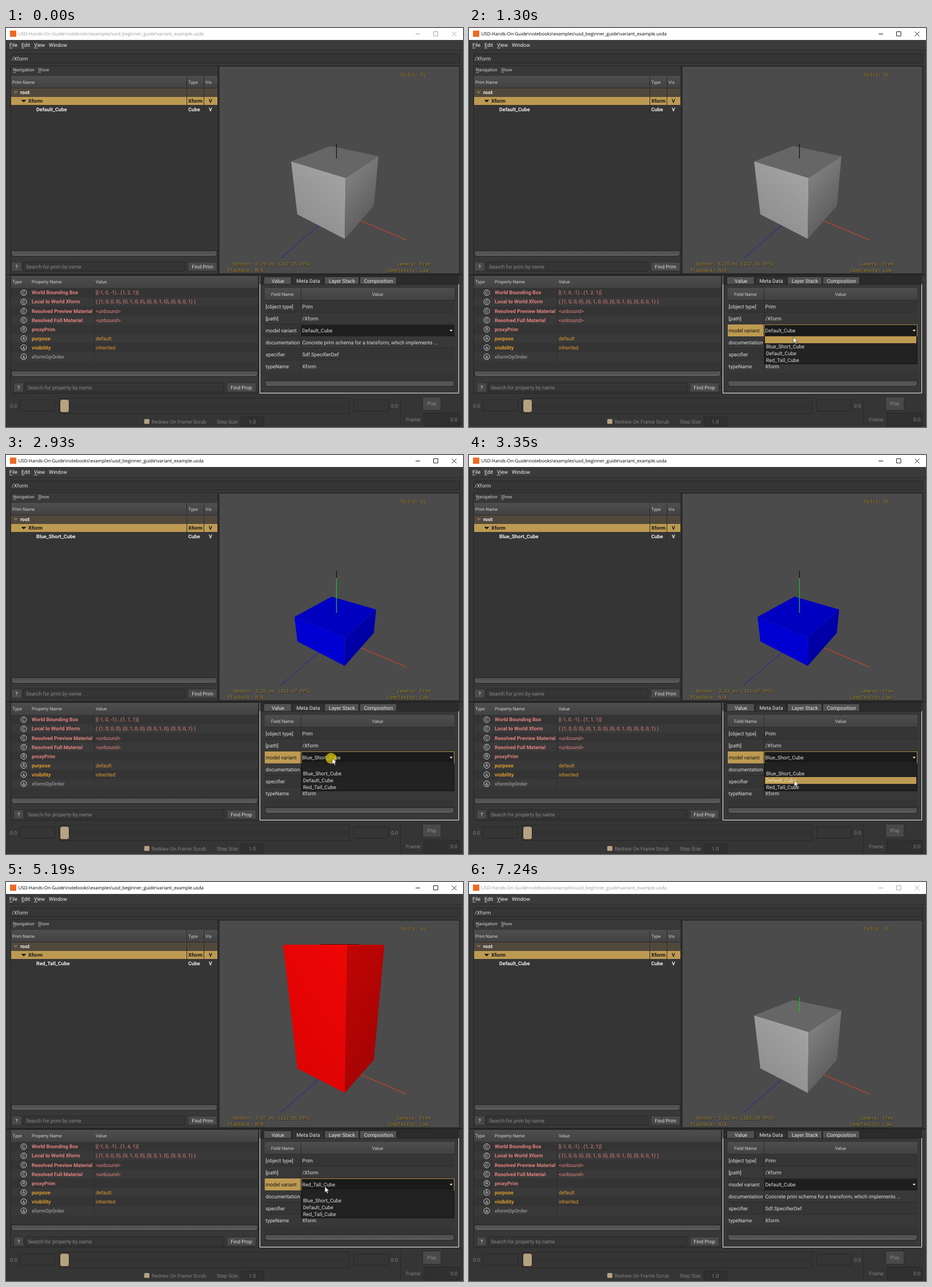
These frames come from a looping animation (800 by 700 pixels, 7.31 s). An HTML page:

```html
<!DOCTYPE html>
<html lang="en">
<head>
<meta charset="utf-8">
<title>Variant switching</title>
<style>
  html, body { margin: 0; width: 100%; height: 100%; overflow: hidden; background: #383838; }
  svg { display: block; width: 800px; height: 700px; }
  text { font-family: Roboto, Arial, sans-serif; text-rendering: geometricPrecision; }
  .title { font-family: "Open Sans", "Noto Sans", sans-serif; }
  .mono { font-family: "DejaVu Sans Mono", "Liberation Mono", monospace; }
</style>
</head>
<body>
<svg viewBox="0 0 800 700">
  <defs>
    <linearGradient id="head" x2="0" y2="1"><stop stop-color="#4e4e4e"/><stop offset="1" stop-color="#424242"/></linearGradient>
    <linearGradient id="bar" x2="0" y2="1"><stop stop-color="#4c4c4c"/><stop offset="1" stop-color="#5c5c5c"/></linearGradient>
  </defs>
  <g id="base"></g>
  <g id="live"></g>
</svg>
<script>
const LOOP = 7310;
const GOLD = '#bd9a52', PINK = '#e2827f', ORANGE = '#dd9a2e', LIGHT = '#dedede', DIM = '#8a8a8a', EDGE = '#262626';

const rect = (x, y, w, h, fill, more = '') =>
  `<rect x="${x}" y="${y}" width="${w}" height="${h}" fill="${fill}" ${more}/>`;
const text = (x, y, str, fill = LIGHT, size = 8.93, more = '') =>
  `<text x="${x}" y="${y}" fill="${fill}" font-size="${size}" ${more}>${str}</text>`;
const bold = (x, y, str, fill) => text(x, y, str, fill, 8.93, 'font-weight="700"');
const small = (x, y, str, more) => text(x, y, str, '#d0d0d0', 7.85, more);
const path = (d, stroke, width = 1, fill = 'none') =>
  `<path d="${d}" stroke="${stroke}" stroke-width="${width}" fill="${fill}"/>`;
const poly = (points, fill) => `<polygon points="${points}" fill="${fill}"/>`;
const field = (x, y, w, h, fill = '#353535') =>
  rect(x + .5, y + .5, w - 1, h - 1, fill, `stroke="${EDGE}" rx="1"`);
const button = (x, y, w, h, label, fill = LIGHT) =>
  rect(x + .5, y + .5, w - 1, h - 1, '#494949', 'stroke="#2c2c2c" rx="1.5"') +
  text(x + w / 2, y + h / 2 + 3.2, label, fill, 8.8, 'text-anchor="middle"');
const scrollbar = (x, y, w) =>
  `<path d="M${x} ${y}h${w}v5q0 5 -6 5h${12 - w}q-6 0 -6 -5z" fill="url(#bar)" stroke="#232323"/>`;
const mono = (x, y, str) =>
  text(x + .8, y + .8, str, '#1c1c1c', 8.08, 'class="mono"') + text(x, y, str, '#a4842a', 8.08, 'class="mono"');

function primPanel() {
  return rect(8, 66, 363, 366, '#383838', 'stroke="#222"') +
    small(12, 76.3, 'Navigation') + small(56, 76.3, 'Show') + path('M12 78h5.5M56 78h5', '#ccc', .7) +
    rect(9, 84, 361, 317, '#353535') + rect(9, 84, 361, 21, 'url(#head)') +
    small(11, 98, 'Prim Name') + small(319, 98, 'Type') + small(349, 98, 'Vis') +
    rect(9, 106, 361, 15, '#51483c') + rect(9, 121, 361, 14, GOLD) +
    path('M316.5 84v66M346.5 84v66', '#2d2d2d') + path('M9 105.5h361', '#2a2a2a') +
    poly('13,111 21,111 17,115.5', '#7b6f5f') + bold(25, 116.3, 'root', '#eee') +
    poly('26.5,126 35.5,126 31,130.5', '#1a1a1a') + bold(39, 131.2, 'Xform', '#151515') +
    bold(319, 131.2, 'Xform', '#151515') + bold(355, 131.2, 'V', '#151515') +
    bold(319, 146, 'Cube', '#eee') + bold(355, 146, 'V', '#eee') +
    scrollbar(9.5, 390.5, 360) +
    button(9, 410, 19, 17, '?') + field(30, 410, 284, 17) +
    text(35, 421.5, 'Search for prim by name', DIM) + button(318, 410, 52, 17, 'Find Prim');
}

function propertyPanel() {
  const rows = [
    ['C', 'World Bounding Box', '', PINK],
    ['C', 'Local to World Xform', '( (1, 0, 0, 0), (0, 1, 0, 0), (0, 0, 1, 0), (0, 0, 0, 1) )', PINK],
    ['C', 'Resolved Preview Material', '&lt;unbound&gt;', PINK],
    ['C', 'Resolved Full Material', '&lt;unbound&gt;', PINK],
    ['R', 'proxyPrim', '', PINK],
    ['A', 'purpose', 'default', ORANGE],
    ['A', 'visibility', 'inherited', ORANGE],
    ['A', 'xformOpOrder', '', DIM]
  ];
  let out = rect(8, 434, 434, 207, '#383838', 'stroke="#222"') +
    rect(9, 435, 432, 177, '#353535') + rect(9, 435, 432, 21, 'url(#head)') +
    small(11, 448.3, 'Type') + small(45, 448.3, 'Property Name') + small(157, 448.3, 'Value');
  rows.forEach(([type, name, value, color], i) => {
    const y = 464.3 + i * 16.07;
    out += rect(9, y - 8, 432, 16, i % 2 ? '#393939' : '#343434') +
      `<circle cx="31" cy="${y}" r="5" fill="none" stroke="#e4e4e4" stroke-width=".9"/>` +
      text(31, y + 2.8, type, '#eee', 7.6, 'text-anchor="middle"') +
      bold(45, y + 3.1, name, color) + text(157, y + 3.1, value, color);
  });
  return out + path('M154.5 456v129', '#2e2e2e') + scrollbar(9.5, 601.5, 431) +
    button(13, 622, 18, 17, '?') + field(33, 622, 349, 17) +
    text(38, 633.7, 'Search for property by name', DIM) + button(386, 622, 52, 17, 'Find Prop');
}

function metaPanel() {
  const tabs = [['Value', 452, 48], ['Meta Data', 502, 54], ['Layer Stack', 558, 60], ['Composition', 620, 64]];
  const rows = [['[object type]', 'Prim'], ['[path]', '/Xform'], ['model variant', ''],
    ['documentation', 'Concrete prim schema for a transform, which implements ...'],
    ['specifier', 'Sdf.SpecifierDef'], ['typeName', 'Xform']];
  let out = rect(444, 434, 349, 207, '#383838') + rect(445, 434, 348, 15, '#2b2b2b') +
    path('M444.5 434v16', '#777') + path('M444.5 449v191.5H792.5V449.5', '#f0f0f0') +
    path('M445 449.5h347', '#222');
  tabs.forEach(([label, x, w], i) => {
    out += rect(x - .5, 436.5, w, 13, i == 1 ? '#333' : '#515151', `stroke="${EDGE}" rx="1"`) +
      text(x + w / 2, 446.6, label, '#e6e6e6', 8.93, 'text-anchor="middle"');
  });
  out += rect(453, 456, 332, 173, '#353535') + rect(453, 456, 332, 21, 'url(#head)') +
    small(464, 470, 'Field Name') + small(650.5, 470, 'Value', 'text-anchor="middle"');
  rows.forEach(([name, value], i) => {
    const y = 478 + i * 21;
    out += rect(453, y, 332, 21, i % 2 ? '#383838' : '#353535') + path(`M453 ${y - .5}h332`, '#2c2c2c') +
      text(454.5, y + 14, name) + text(518.5, y + 14, value);
  });
  return out + path('M516.5 456v148', '#2c2c2c') + scrollbar(453.5, 618.5, 331);
}

function timeline() {
  const label = (x, y, str) => text(x, y, str, '#828282');
  return rect(0, 642, 800, 58, '#353535') + path('M690.5 647v53', '#2a2a2a') +
    label(7, 666, '0.0') + field(24, 652, 62, 21) +
    field(92, 649, 509, 28) + path('M94 663h505', '#323232', 10) +
    rect(94.5, 651.5, 16, 23, '#b6a181', 'rx="4" stroke="#242424"') +
    field(608, 652, 62, 21) + label(674, 666, '0.0') +
    button(729, 647, 33, 24, 'Play', DIM) + label(700, 690.2, 'Frame:') +
    field(731, 675, 63, 24, '#303030') + label(778, 690.2, '0.0') +
    rect(242, 686, 9, 8.5, '#b6a181', 'rx="1.5"') + label(255, 693.7, 'Redraw On Frame Scrub') +
    label(369, 693.7, 'Step Size') + field(411, 682, 41, 17, '#303030') + label(425, 693.7, '1.0');
}

document.getElementById('base').innerHTML =
  rect(0, 0, 800, 700, '#383838') + rect(0, 0, 800, 21, '#fff') + rect(7, 4.5, 11, 11, '#ee6a22') +
  rect(0, 21, 800, 17.5, '#3b3b3b') + path('M0 39h800', '#2b2b2b') + path('M.5 21v679', '#222') +
  [['File', 6], ['Edit', 27], ['View', 49], ['Window', 75]].map(([s, x]) => text(x, 33, s, '#f2f2f2')).join('') +
  path('M6 35h5M27 35h5M49 35h6', '#eee', .8) +
  field(8, 45, 786, 17) + text(10, 56.6, '/Xform') +
  rect(372, 66, 422, 366, '#222') + rect(373.5, 67.5, 419.5, 363, '#4b4b4b') +
  path('M0 433h800', '#1f1f1f', 1.5) +
  primPanel() + propertyPanel() + metaPanel() + timeline();

// Lid corners left, front, right and back, standing on a fixed footing.
function solid([left, front, right, back], [lid, nearTop, nearLow, farTop, farLow]) {
  const shade = (id, a, b, dir) =>
    `<linearGradient id="${id}" ${dir}><stop stop-color="${a}"/><stop offset="1" stop-color="${b}"/></linearGradient>`;
  return shade('near', nearTop, nearLow, 'x1=".9" y1="0" x2=".3" y2="1"') +
    shade('far', farTop, farLow, 'x1=".2" y1="0" x2=".7" y2="1"') +
    poly(`${left} ${front} 593,370 510,327`, 'url(#near)') +
    poly(`${front} ${right} 644,312 593,370`, 'url(#far)') +
    (back ? poly(`${left} ${back} ${right} ${front}`, lid) : path('M550 109.5h68', lid));
}

const GREY = { name: 'Default_Cube', height: 2,
  lid: ['499,234', '594.5,263', '652,225', '568,207'], shades: ['#666', '#a6a6a6', '#8c8c8c', '#868686', '#545454'] };
const MODELS = [
  { ...GREY, stats: '6.79 ms (147.35 FPS)', axis: path('M578.5 203v26', '#111', 1.2) },
  { name: 'Blue_Short_Cube', height: 1, stats: '3.21 ms (311.67 FPS)',
    lid: ['505,284', '593.5,320', '648,271', '570,248.5'], shades: ['#0000c0', '#0000da', '#0000cc', '#0000b6', '#000096'],
    axis: path('M578.5 203v13', '#111', 1.2) + path('M578.5 216v61', '#1fb040', 1.4) },
  { name: 'Red_Tall_Cube', height: 4, stats: '7.57 ms (132.05 FPS)',
    lid: ['485,110', '597,110', '662.5,110'], shades: ['#5a0808', '#ee0606', '#dc0202', '#c00404', '#a00404'], axis: '' },
  { ...GREY, stats: '5.52 ms (181.29 FPS)', axis: path('M578.5 202v27', '#12c412', 1.3) }
];

function scene(m) {
  return path('M621 338L701 372', '#d8402c', 1.1) + path('M548 346L481 404', '#2c2c90', 1.1) +
    solid(m.lid, m.shades) + m.axis +
    mono(692, 83.5, 'Hydra: GL') + mono(398, 417.3, 'Render: ' + m.stats) + mono(388, 427.8, 'Playback: N/A') +
    mono(685, 417.3, 'Camera: Free') + mono(667, 427.8, 'Complexity: Low') +
    bold(53, 146, m.name, '#eee') + text(157, 467.4, `[(-1, 0, -1)...(1, ${m.height}, 1)]`, PINK);
}

function titleBar(active) {
  const ink = active ? '#000' : '#9a9a9a';
  return text(21.5, 13.2, 'USD-Hands-On-Guide\\notebooks\\examples\\usd_beginner_guide\\variant_example.usda',
    ink, 8, 'class="title"') +
    path('M717 10.5h8M748.5 6.5h7.5v7.5h-7.5zM780.5 6.5l8 8m0 -8l-8 8', ink, .9);
}

function combo(name, open, y) {
  let out = rect(517, 521, 268, 20, '#1e1e1e');
  if (open) {
    out += rect(453, 520, 62.5, 21, GOLD) + text(454.5, 534, 'model variant', '#151515') +
      rect(517, 520.5, 267.5, 20.5, '#1a1a1a', `stroke="${GOLD}" stroke-width=".9"`) +
      rect(517.5, 541, 266.5, 48, '#222', 'stroke="#0c0c0c"');
    ['', 'Blue_Short_Cube', 'Default_Cube', 'Red_Tall_Cube'].forEach((item, i) => {
      const top = 541 + i * 12, hover = y >= top && y < top + 12;
      if (hover) out += rect(518, top, 265, 12, GOLD);
      out += text(520, top + 9.2, item, hover ? '#f3e6c4' : LIGHT);
    });
  }
  return out + text(518.5, 534, name) + poly('776.5,529.5 782,529.5 779.2,532.5', '#eee');
}

// start, end, steps, then from, bend and to
const MOVES = [
  [70, 830, 12, 648, 637, 445, 540, 571, 532],
  [1100, 1510, 7, 571, 532, 567, 545, 562, 557],
  [2040, 2730, 10, 562, 557, 611, 548, 571, 532],
  [3000, 3350, 6, 571, 532, 572, 550, 570, 569],
  [3350, 3560, 4, 570, 569, 568, 575, 565, 580],
  [3890, 4380, 8, 565, 580, 561, 558, 559, 537],
  [4510, 4650, 3, 559, 537, 559, 532, 558, 529],
  [5120, 5680, 9, 558, 529, 559, 550, 553.5, 566],
  [6490, 6980, 8, 553.5, 566, 630, 610, 748, 701]
];

function pointer(t) {
  const move = MOVES.findLast(m => t >= m[0]);
  if (!move) return [0, 800];
  const [t0, t1, n, ax, ay, bx, by, cx, cy] = move;
  const p = Math.min(1, Math.floor((t - t0) / (t1 - t0) * (n - 1) + 1.001) / n);
  const u = p * p * (3 - 2 * p), v = 1 - u;
  const bend = (a, b, c) => v * v * a + 2 * u * v * b + u * u * c;
  return [bend(ax, bx, cx), bend(ay, by, cy)];
}

const within = (t, spans) => spans.some(([a, b]) => t >= a && t < b);
const CLICKS = [960, 1710, 2860, 3690, 4980, 5960].map(t => [t, t + 130]);
const OPEN = [[1030, 1840], [2930, 3820], [5050, 6090]];
const CHANGES = [1840, 3820, 6090];

function render(t) {
  const [x, y] = pointer(t);
  const model = MODELS[CHANGES.filter(c => t >= c).length];
  let out = titleBar(t >= 960 && t < 7240) + scene(model);
  if (within(t, [[1840, 2930]]))
    out += rect(517, 542, 268, 20, '#464646') +
      text(518.5, 555, 'Concrete prim schema for a transform, which implements ...');
  out += combo(model.name, within(t, OPEN), y);
  if (within(t, CLICKS))
    out += `<circle cx="${x - 2}" cy="${y}" r="9.5" fill="#e2d000" opacity=".7"/>`;
  return out + `<g transform="translate(${x} ${y})">` +
    path('M0 0V10.6L2.4 8.4L4.2 12.2L5.9 11.4L4.2 7.7H7.6Z', '#111', .6, '#fff') + '</g>';
}

const live = document.getElementById('live');
let shown = '';
function tick() {
  const next = render(performance.now() % LOOP);
  if (next !== shown) live.innerHTML = shown = next;
  requestAnimationFrame(tick);
}
tick();
</script>
</body>
</html>
```
